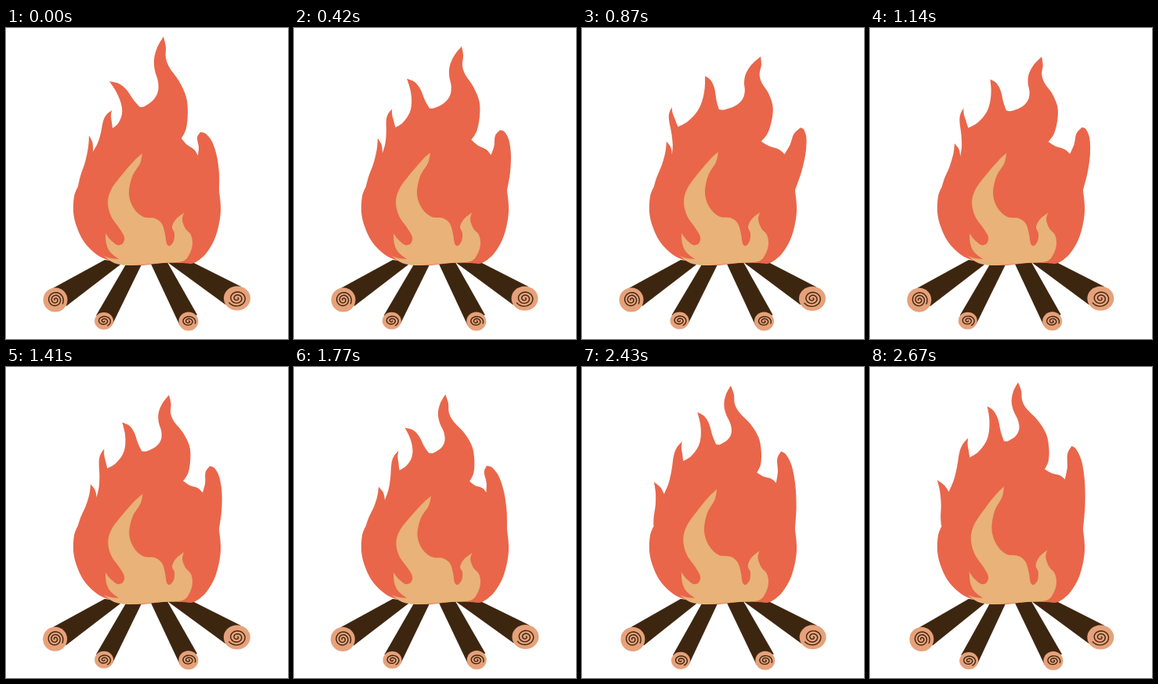
Animation of 360x397 px, one loop 2700 ms. Source, as an HTML page with a canvas:

```html
<!DOCTYPE html>
<html lang="en">
<head>
<meta charset="utf-8">
<title>Campfire</title>
<style>
html, body { margin: 0; width: 100%; height: 100%; overflow: hidden; background: #fff; }
canvas { display: block; width: 360px; height: 397px; }
</style>
</head>
<body>
<canvas id="stage"></canvas>
<script>
const LOOP = 2700, STEP = 30, PHASE = 900;
const RED = '#e9664a', TAN = '#e8b278', BARK = '#3d2610', WOOD = '#e6a17a';

const canvas = document.getElementById('stage');
const ctx = canvas.getContext('2d');
const dpr = window.devicePixelRatio || 1;
canvas.width = 360 * dpr;
canvas.height = 397 * dpr;

// Tips and valleys of the outer flame: x, y at the start and after each phase.
const pins = {
  L: [[92, 202], [92, 202], [92, 202], [91, 203]],
  A: [[106, 137], [108, 145], [108, 153], [85, 144]],
  a: [[111, 158], [115, 162], [116, 170], [100, 159]],
  B: [[135, 105], [114, 101], [134, 107], [125, 90]],
  b: [[136, 128], [122, 126], [135, 132], [127, 115]],
  C: [[132, 68], [158, 61], [141, 78], [150, 49]],
  c: [[171, 101], [175, 104], [172, 110], [171, 94]],
  D: [[201, 11], [229, 37], [192, 35], [189, 19]],
  V: [[224, 141], [229, 145], [224, 146], [223, 130]],
  e: [[245, 163], [259, 161], [245, 160], [249, 143]],
  E: [[248, 133], [280, 127], [245, 126], [258, 100]],
  R: [[272, 207], [272, 207], [272, 207], [272, 207]]
};

// Edges between pins, with resting points that follow both ends.
const edges = [
  ['L', 'A', [[95, 189], [101, 171], [105, 152]]],
  ['A', 'a', [[110, 145], [111, 151]]],
  ['a', 'B', [[117, 147], [121, 134], [124, 119], [128, 111]]],
  ['B', 'b', [[134, 112], [135, 120]]],
  ['b', 'C', [[143, 122], [148, 110], [147, 97], [141, 82]]],
  ['C', 'c', [[144, 71], [154, 79], [163, 92]]],
  ['c', 'D', [[177, 100], [188, 92], [194, 81], [194, 68], [190, 54], [189, 40], [193, 25]]],
  ['D', 'V', [[204, 24], [204, 38], [209, 51], [221, 68], [230, 88], [232, 108], [230, 128]]],
  ['V', 'e', [[231, 149], [240, 155]]],
  ['e', 'E', [[246, 152], [244, 140]]],
  ['E', 'R', [[255, 135], [263, 145], [269, 163], [272, 185]]]
];

const base = [[272, 207], [274, 235], [268, 265], [256, 287], [240, 300], [225, 300],
  [200, 300], [165, 303], [130, 296], [113, 287], [99, 272], [90, 253], [86, 235], [87, 215], [92, 202]];

const inner = [
  [[174, 160], [171, 173], [161, 190], [157, 212], [163, 230], [175, 241], [190, 243], [199, 250],
    [203, 263], [205, 275], [209, 278], [214, 272], [215, 262], [212, 254], [217, 244], [227, 236]],
  [[227, 236], [225, 245], [229, 256], [236, 264], [238, 276], [234, 289], [225, 298],
    [200, 300], [175, 302], [155, 303], [138, 300], [125, 291]],
  [[125, 291], [134, 294], [144, 295]],
  [[144, 295], [133, 286], [128, 275], [127, 262]],
  [[127, 262], [133, 270], [142, 277], [149, 275], [151, 267], [145, 256], [134, 240],
    [130, 222], [135, 205], [150, 185], [164, 169], [174, 160]]
];
const innerShift = [[0, 0], [0, -2], [1, 5], [-3, -8]];

const logs = [
  { x: 63, y: 347, rx: 15.5, ry: 15.5, bark: [[60, 332], [126, 296], [150, 299], [77, 355]],
    spiral: [10.5, 10.5, 3, 2.6], drift: [[0, 0], [0, 0], [-.7, .5], [3, .5]] },
  { x: 125, y: 374, rx: 12, ry: 11, bark: [[115, 367], [154, 300], [174, 300], [136, 378]],
    spiral: [9, 7, .4, 2.1], drift: [[0, 0], [-.5, -.5], [.5, 0], [1.2, 1]] },
  { x: 233, y: 374.5, rx: 12.5, ry: 12, bark: [[184, 299], [206, 299], [244, 366], [222, 380]],
    spiral: [9, 7, 5.4, 2.2], drift: [[0, 0], [-.5, 0], [.3, -.5], [1, .5]] },
  { x: 295, y: 345, rx: 17, ry: 15.5, bark: [[206, 299], [236, 298], [300, 330], [280, 353]],
    spiral: [12, 10.5, 5.7, 2.5], drift: [[0, 0], [-1, .5], [.5, -.5], [-.7, 0]] }
];

const mix = (p, q, k) => [p[0] + (q[0] - p[0]) * k, p[1] + (q[1] - p[1]) * k];

function pose(keys, t) {
  const i = Math.min(2, Math.floor(t / PHASE));
  return mix(keys[i], keys[i + 1], t / PHASE - i);
}

// Smooth curve through the points, continuing the current path.
function curve(pts) {
  for (let i = 0; i < pts.length - 1; i++) {
    const p = pts[i], q = pts[i + 1];
    const before = pts[i - 1] || p, after = pts[i + 2] || q;
    ctx.bezierCurveTo(
      p[0] + (q[0] - before[0]) / 6, p[1] + (q[1] - before[1]) / 6,
      q[0] - (after[0] - p[0]) / 6, q[1] - (after[1] - p[1]) / 6,
      q[0], q[1]);
  }
}

function bend([from, to, mids], t) {
  const rest = [pins[from][0], ...mids, pins[to][0]];
  const along = [0];
  for (let i = 1; i < rest.length; i++) {
    along[i] = along[i - 1] + Math.hypot(rest[i][0] - rest[i - 1][0], rest[i][1] - rest[i - 1][1]);
  }
  const offset = id => {
    const p = pose(pins[id], t);
    return [p[0] - pins[id][0][0], p[1] - pins[id][0][1]];
  };
  const start = offset(from), end = offset(to), total = along[along.length - 1];
  return rest.map((p, i) => {
    const d = mix(start, end, along[i] / total);
    return [p[0] + d[0], p[1] + d[1]];
  });
}

function drawLog(log, t) {
  const [dx, dy] = pose(log.drift, t);
  const x = log.x + dx, y = log.y + dy;
  ctx.fillStyle = BARK;
  ctx.beginPath();
  for (const [px, py] of log.bark) {
    const k = py > 310 ? 1 : 0;
    ctx.lineTo(px + dx * k, py + dy * k);
  }
  ctx.fill();

  ctx.fillStyle = WOOD;
  ctx.beginPath();
  ctx.ellipse(x, y, log.rx, log.ry, 0, 0, Math.PI * 2);
  ctx.fill();

  const [rx, ry, phase, turns] = log.spiral;
  ctx.beginPath();
  for (let i = 0; i <= 80; i++) {
    const k = i / 80, angle = phase + k * turns * Math.PI * 2, r = .1 + .9 * k;
    ctx.lineTo(x + Math.cos(angle) * rx * r, y + Math.sin(angle) * ry * r);
  }
  ctx.strokeStyle = BARK;
  ctx.lineWidth = 1.4;
  ctx.stroke();
}

function drawFlame(t) {
  ctx.fillStyle = RED;
  ctx.beginPath();
  ctx.moveTo(...pose(pins.L, t));
  edges.forEach(edge => curve(bend(edge, t)));
  curve(base);
  ctx.fill();

  const [dx, dy] = pose(innerShift, t);
  const lift = ([x, y]) => {
    const k = Math.max(0, (270 - y) / 110);
    return [x + dx * k, y + dy * k];
  };
  ctx.fillStyle = TAN;
  ctx.beginPath();
  ctx.moveTo(...lift(inner[0][0]));
  inner.forEach(part => curve(part.map(lift)));
  ctx.fill();
}

function draw(t) {
  ctx.setTransform(dpr, 0, 0, dpr, 0, 0);
  ctx.fillStyle = '#fff';
  ctx.fillRect(0, 0, 360, 397);
  ctx.lineJoin = ctx.lineCap = 'round';
  logs.forEach(log => drawLog(log, t));
  drawFlame(t);
}

const began = performance.now();
function tick() {
  const t = (performance.now() - began) % LOOP;
  draw(Math.floor(t / STEP) * STEP);
  requestAnimationFrame(tick);
}
tick();
</script>
</body>
</html>
```
